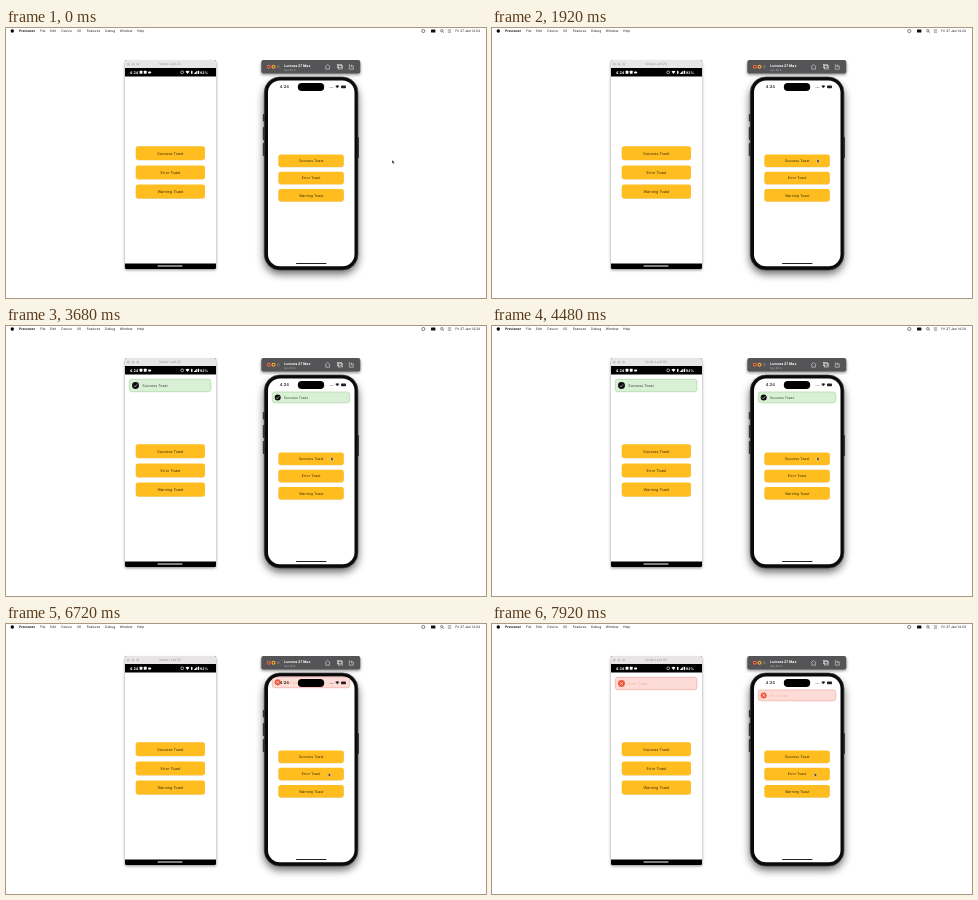
These frames come from a looping animation (480x270 px, 8 s). An HTML page:

```html
<!DOCTYPE html>
<html lang="en">
<head>
<meta charset="utf-8">
<title>Toast demo</title>
<style>
  html, body { margin: 0; width: 100%; height: 100%; overflow: hidden; background: #fff; }
  svg { display: block; width: 480px; height: 270px; }
  text { font-family: Inter, Roboto, sans-serif; text-rendering: geometricPrecision; }
  .b { font-weight: 700; }
  .mid { text-anchor: middle; }
  .line { fill: none; stroke-width: .6; }
</style>
</head>
<body>
<svg id="stage" viewBox="0 0 480 270">
  <defs>
    <clipPath id="leftClip"><rect x="119" y="48.5" width="91" height="187"/></clipPath>
    <clipPath id="rightClip"><rect x="262" y="52.5" width="86.5" height="186" rx="12"/></clipPath>
    <filter id="soft" x="-30%" y="-20%" width="160%" height="140%"><feGaussianBlur stdDeviation="4.5"/></filter>
    <filter id="faint" x="-20%" y="-10%" width="140%" height="120%"><feGaussianBlur stdDeviation="1.4"/></filter>
  </defs>

  <!-- menu bar -->
  <circle cx="6.3" cy="3" r="1.7"/>
  <g id="menu" font-size="3.3" fill="#222"></g>
  <g class="line" stroke="#333">
    <circle cx="417.3" cy="3" r="1.6"/>
    <circle cx="435.8" cy="2.7" r="1.2"/><path d="M436.7 3.6l1.1 1.1"/>
    <path d="M441.8 2h3.4M441.8 4.1h3.4"/>
  </g>
  <rect x="425" y="1.4" width="4.4" height="3.2" rx=".6" fill="#111"/>

  <!-- left device -->
  <rect x="119" y="34" width="91" height="208" fill="#000" opacity=".45" filter="url(#faint)"/>
  <rect x="119" y="32" width="91" height="209" rx="1.5" fill="#000"/>
  <path d="M119 40v-6.5q0-1.5 1.5-1.5h88q1.5 0 1.5 1.5v6.5z" fill="#e8e5e6"/>
  <g fill="#c9c6c7"><circle cx="122.3" cy="36.2" r="1.4"/><circle cx="127" cy="36.2" r="1.4"/><circle cx="131.7" cy="36.2" r="1.4"/></g>
  <text class="mid" x="164" y="37.4" font-size="3.4" fill="#999">Velda Leaf 20</text>
  <rect x="119" y="48.5" width="91" height="187" fill="#fff"/>
  <g fill="#fff">
    <text class="b" x="123.8" y="45.8" font-size="3.7">4:24</text>
    <rect x="133.6" y="42.8" width="2.8" height="3" rx=".5"/>
    <rect x="137.8" y="42.8" width="2.8" height="3" rx=".5"/>
    <rect x="142" y="43.4" width="3.2" height="2" rx="1"/>
    <path d="M179.5 43.4q2-1.4 4 0l-2 2.5zM187.8 45.9l3-3.2v3.2z"/>
    <rect x="185" y="42.7" width="1.5" height="3.2" rx=".7"/>
    <rect x="191.6" y="42.7" width="1.6" height="3.2" rx=".4"/>
    <text class="b" x="194" y="45.7" font-size="3.5">92%</text>
    <rect x="151.5" y="237.4" width="25" height="1.1" rx=".5"/>
  </g>
  <circle class="line" cx="176.2" cy="44.3" r="1.4" stroke="#fff"/>
  <g id="leftButtons"></g>
  <g id="leftToasts" clip-path="url(#leftClip)"></g>

  <!-- right toolbar -->
  <rect x="255" y="34" width="99.5" height="13" rx="2" opacity=".4" filter="url(#faint)"/>
  <rect x="255.3" y="32" width="99" height="13.6" rx="2" fill="#555456"/>
  <circle cx="262.8" cy="38.8" r="2" fill="#ee6a45"/>
  <circle cx="267.5" cy="38.8" r="2" fill="#f0ad3c"/>
  <circle cx="272.2" cy="38.8" r="1.8" fill="#6b6a6c"/>
  <g fill="#4c2419"><circle cx="262.8" cy="38.8" r=".8"/><circle cx="267.5" cy="38.8" r=".8"/></g>
  <text class="b" x="278.3" y="38.6" font-size="3.5" fill="#fff">Lumora 27 Max</text>
  <text x="278.3" y="42.6" font-size="2.7" fill="#b5b4b6">Sys 20.3</text>
  <g class="line" stroke="#ddd">
    <path d="M319 38.8l2.6-2.3 2.6 2.3M319.8 38.6v2.6h3.6v-2.6"/>
    <rect x="331.3" y="36.4" width="4" height="3.4"/><rect x="332.6" y="37.6" width="4" height="3.4"/>
    <path d="M344 36.7h-.7v4.5h4v-3.3h-2.6l1.4-1.3M344.7 37.9l1.4 1.2"/>
  </g>

  <!-- right device -->
  <rect x="258" y="54" width="94" height="192" rx="16" opacity=".6" filter="url(#soft)"/>
  <g fill="#333">
    <rect x="256.8" y="86" width="2" height="7.5" rx=".7"/>
    <rect x="256.8" y="99" width="2" height="13" rx=".7"/>
    <rect x="256.8" y="115" width="2" height="13" rx=".7"/>
    <rect x="351" y="109" width="2" height="21" rx=".7"/>
  </g>
  <rect x="258.3" y="49" width="93.6" height="193" rx="15.5" fill="#0a0a0a" stroke="#3b3b3d" stroke-width=".7"/>
  <rect x="262" y="52.5" width="86.5" height="185.7" rx="12" fill="#fff"/>
  <g id="rightButtons"></g>
  <g id="rightToasts" clip-path="url(#rightClip)"></g>
  <rect x="291.8" y="55" width="26.4" height="8" rx="4"/>
  <text x="273.8" y="60.2" font-size="4" font-weight="600" fill="#222">4:24</text>
  <g fill="#222">
    <circle cx="324" cy="59.4" r=".4"/><circle cx="325.5" cy="59.4" r=".4"/><circle cx="327" cy="59.4" r=".4"/>
    <path d="M329.3 58.1q2-1.6 4 0l-2 2.2z"/>
    <rect x="335" y="57.4" width="5" height="2.8" rx=".8"/>
    <rect x="290" y="234.9" width="30.5" height="1.1" rx=".5"/>
  </g>

  <path id="cursor" d="M0 0v3.6l.9-.8.6 1.3.7-.3-.6-1.3h1.2z" fill="#111" stroke="#fff" stroke-width=".35"/>
</svg>

<script>
const LOOP = 8000, STEP = 80;
const $ = id => document.getElementById(id);

const menu = [[13, 'Previewer'], [34, 'File'], [44, 'Edit'], [55.3, 'Device'], [70.8, 'I/O'],
  [80.8, 'Features'], [99, 'Debug'], [113.8, 'Window'], [131, 'Help'], [449.3, 'Fri 27 Jan  14:24']];
$('menu').innerHTML = menu.map(([x, s], i) =>
  `<text x="${x}" y="4.2" ${i ? '' : 'class="b"'}>${s}</text>`).join('');

function buttons(id, x, y, w, h, gap, size) {
  $(id).innerHTML = ['Success', 'Error', 'Warning'].map((s, i) => {
    const top = y + i * gap;
    return `<rect x="${x}" y="${top + .5}" width="${w}" height="${h}" rx="2.4" fill="#d9c79a" opacity=".6"/>
      <rect x="${x}" y="${top}" width="${w}" height="${h}" rx="2.4" fill="#ffbd1f"/>
      <text class="mid" x="${x + w / 2}" y="${top + h / 2 + 1.4}" font-size="${size}" fill="#40310d">${s} Toast</text>`;
  }).join('');
}
buttons('leftButtons', 129.8, 118.2, 69.2, 13.8, 19.2, 3.8);
buttons('rightButtons', 272.4, 126.5, 65.4, 12.4, 17.3, 3.6);

const kinds = {
  Success: { fill: '#daf0d6', edge: '#a9d8a3', icon: '#0b0b0b', ink: '#3c4f3b', mark: 'M-1.6 .1l1.1 1.2 2.1-2.4' },
  Error: { fill: '#fddcd8', edge: '#f4aaa5', icon: '#ee5a3c', ink: '#f0b39a', mark: 'M-1.2-1.2l2.4 2.4M1.2-1.2l-2.4 2.4' }
};

// Each toast slides down from `hide` px above its place, then back up at `out`.
const toasts = [];
function toast(parent, kind, x, y, w, h, size, hide, start, out) {
  const k = kinds[kind], r = h * .28, cy = y + h / 2, cx = x + h / 2;
  const el = document.createElementNS('http://www.w3.org/2000/svg', 'g');
  el.innerHTML = `<rect x="${x}" y="${y}" width="${w}" height="${h}" rx="2.4" fill="${k.fill}" stroke="${k.edge}" stroke-width=".7"/>
    <circle cx="${cx}" cy="${cy}" r="${r}" fill="${k.icon}"/>
    <path class="line" d="${k.mark}" transform="translate(${cx} ${cy})" stroke="#fff"/>
    <text x="${x + h + .6}" y="${cy + 1.3}" font-size="${size}" fill="${k.ink}">${kind} Toast</text>`;
  $(parent).append(el);
  toasts.push({ el, hide, start, out });
}
toast('leftToasts', 'Success', 123.3, 53.3, 81.6, 12.4, 3.7, 22, 3320, 5320);
toast('leftToasts', 'Error', 123.3, 53.3, 81.6, 12.4, 3.7, 22, 6720, 9000);
toast('rightToasts', 'Success', 266.3, 66, 77.4, 10.8, 3.5, 30, 3190, 5190);
toast('rightToasts', 'Error', 266.3, 66, 77.4, 10.8, 3.5, 30, 6623, 9000);

const path = [[0, 386, 132], [400, 386, 132], [880, 361, 137.5], [1600, 325, 131], [4640, 325, 131], [5200, 322.5, 149]];
const part = (t, a, b) => Math.min(1, Math.max(0, (t - a) / (b - a)));
const smooth = u => u * u * (3 - 2 * u);

function draw(t) {
  let [, x, y] = path[0];
  for (let i = 1; i < path.length; i++) {
    const [t0, x0, y0] = path[i - 1], [t1, x1, y1] = path[i];
    const u = smooth(part(t, t0, t1));
    x += (x1 - x0) * u;
    y += (y1 - y0) * u;
  }
  $('cursor').setAttribute('transform', `translate(${x} ${y})`);
  for (const { el, hide, start, out } of toasts) {
    const away = (1 - part(t, start, start + 400)) ** 3 + part(t, out, out + 400) ** 3;
    el.setAttribute('transform', `translate(0 ${-hide * away})`);
    el.style.display = away < 1 ? '' : 'none';
  }
}

const begin = performance.now();
function frame() {
  const t = (performance.now() - begin) % LOOP;
  draw(Math.floor(t / STEP) * STEP);
  requestAnimationFrame(frame);
}
frame();
</script>
</body>
</html>
```
